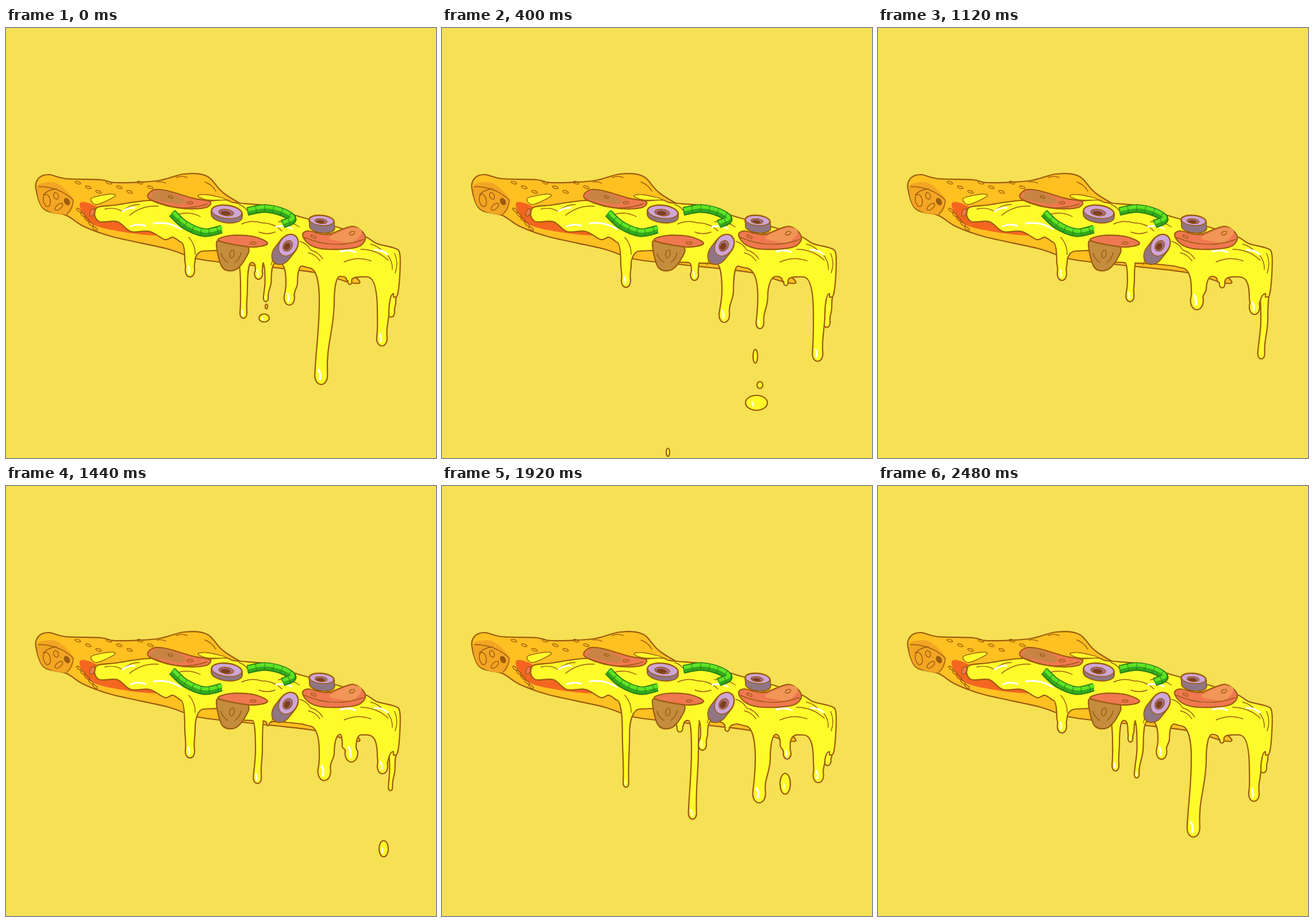
These frames come from a looping animation (748x748 px, 2560 ms). An HTML page with a canvas:

```html
<!DOCTYPE html>
<html lang="en">
<head>
<meta charset="utf-8">
<title>Melting slice</title>
<style>
html, body { margin: 0; width: 100%; height: 100%; overflow: hidden; background: #f6e053; }
canvas { display: block; }
</style>
</head>
<body>
<canvas id="stage" width="748" height="748"></canvas>
<script>
const ctx = document.getElementById('stage').getContext('2d');
const STEP = 80, STEPS = 32, GRAVITY = 14, THIN = 1.4, BOLD = 2.2;
const INK = '#9b5b0d', CHEESE = '#fffb2b', CRUST = '#ffc021', CRUST_DARK = '#f3a523', SAUCE = '#f4661f';
const RED = '#ef7851', TAN = '#c98445', PEACH = '#f19656', LILAC = '#cda5d8';

// Adds a smooth curve through flat x,y points to a path.
function spline(path, pts, closed, join) {
  const n = pts.length / 2;
  const at = i => {
    const j = closed ? (i + n) % n : Math.max(0, Math.min(n - 1, i));
    return [pts[2 * j], pts[2 * j + 1]];
  };
  path[join ? 'lineTo' : 'moveTo'](pts[0], pts[1]);
  for (let i = 0; i < (closed ? n : n - 1); i++) {
    const [a, b, c, d] = [at(i - 1), at(i), at(i + 1), at(i + 2)];
    path.bezierCurveTo(b[0] + (c[0] - a[0]) / 6, b[1] + (c[1] - a[1]) / 6,
      c[0] - (d[0] - b[0]) / 6, c[1] - (d[1] - b[1]) / 6, c[0], c[1]);
  }
  if (closed) path.closePath();
}

function paint(path, fill, width = BOLD, ink = INK) {
  if (fill) { ctx.fillStyle = fill; ctx.fill(path); }
  if (width) { ctx.lineWidth = width; ctx.strokeStyle = ink; ctx.stroke(path); }
}

function curve(pts, closed) {
  const p = new Path2D();
  spline(p, pts, closed);
  return p;
}

function blob(pts, fill, width) {
  const p = curve(pts, true);
  paint(p, fill, width);
  return p;
}

function oval(x, y, rx, ry, turn = 0, fill = null, width = THIN) {
  const p = new Path2D();
  p.ellipse(x, y, rx, ry, turn, 0, Math.PI * 2);
  paint(p, fill, width);
}

// Short strokes, each given by its two ends and bent upwards a little.
function strokes(ends, width = THIN, ink = INK) {
  const p = new Path2D();
  for (let i = 0; i < ends.length; i += 4) {
    const [x0, y0, x1, y1] = ends.slice(i, i + 4);
    p.moveTo(x0, y0);
    p.quadraticCurveTo((x0 + x1) / 2 + (y1 - y0) / 5, (y0 + y1) / 2 - (x1 - x0) / 5, x1, y1);
  }
  paint(p, null, width, ink);
}

// Height of the cheese rim at x, and any other value along flat pairs.
function along(pairs, t) {
  let i = 0;
  while (i < pairs.length - 4 && pairs[i + 2] <= t) i += 2;
  const [a, va, b, vb] = pairs.slice(i, i + 4);
  const u = Math.min(1, (t - a) / (b - a));
  return { value: va + (vb - va) * u, slope: (vb - va) / (b - a) };
}
const RIM = [303,372, 344,388, 403,407, 477,410, 515,414, 581,432, 628,433, 674,462];
const rim = x => along(RIM, x).value;

// A strand: centre, half width, bulb radius, drift per length, root ends, then step,tip pairs.
function makeDrip(x, w, r, lean, left, right, keys) {
  return { x, w, r, lean, left, right, keys: keys.concat(STEPS, keys[1]) };
}
const edge = makeDrip(672, 6, 6, -.045, 660, 682, [0,503, 9,535, 17,600, 18,530, 20,492, 27,482]);
const back = makeDrip(320, 9, 8, 0, 303, 344, [0,433, 5,451, 9,438, 14,439, 24,524, 25,440, 27,416]);
const front = [
  makeDrip(656, 10, 9, -.02, 628, 674, [0,553, 9,601, 10,560, 12,497, 21,502]),
  makeDrip(597, 12, 11, .08, 581, 618, [0,446, 14,452, 23,515, 24,475, 27,452]),
  makeDrip(558, 13, 11, -.05, 526, 581, [0,620, 3,640, 5,523, 9,473, 14,490, 21,529, 27,573]),
  makeDrip(497, 10, 9, -.06, 477, 515, [0,482, 7,524, 9,459, 13,413, 22,413]),
  makeDrip(456, 6, 7, -.06, 447, 468, [0,476, 3,410, 17,410, 27,481, 31,508]),
  makeDrip(440, 6, 7, -.025, 429, 448, [0,437, 5,439, 14,476, 25,590, 26,550, 29,462]),
  makeDrip(414, 6, 6, -.01, 403, 427, [0,505, 1,515, 2,450, 4,408, 22,408, 27,458])
];

// Falling pieces: step of release, x, y, half width, half height.
const drops = [
  [-.5, 449, 501, 9, 7], [-.5, 453, 481, 2, 4], [1, 393, 514, 3, 7],
  [4, 547, 638, 19, 13], [4, 553, 607, 5, 6], [4, 545, 557, 4, 12],
  [8, 490, 514, 12, 11], [8, 492, 471, 4, 11], [18, 657, 631, 8, 14], [24, 597, 518, 9, 18],
  [25, 320, 499, 10, 27], [25, 315, 459, 4, 7], [26, 433, 583, 14, 11], [26, 438, 534, 4, 4]
];

// The bulb is thin while a strand snaps back.
function tipAt({ keys, x, r, lean, left, right }, k) {
  const { value: y, slope } = along(keys, k);
  const base = (rim(left) + rim(right)) / 2, len = y - base;
  return { y, base, len, x: x + lean * len, r: Math.min(slope < -6 ? r * .6 : r, len / 4) };
}

// Runs the rim from the right root, round the tip, to the left root.
function hang(path, drip, k) {
  const { left, right, x } = drip, ly = rim(left), ry = rim(right);
  const { y, base, len, x: tx, r } = tipAt(drip, k);
  path.lineTo(right, ry);
  if (len < 4) { path.lineTo(left, ly); return; }
  const flare = Math.min(50, len * .45), w = Math.min(drip.w, r * 1.3);
  const mid = base + flare, neck = y - r * 1.7, span = neck - mid, dip = neck + r * 2.27;
  const side = (s, root) => [x + s * w + (root - x - s * w) * .35, x + s * w, tx + s * r * .75, tx + s * r];
  const [r0, r1, r2, r3] = side(1, right), [l0, l1, l2, l3] = side(-1, left);
  path.bezierCurveTo(r0, ry, r1, ry + flare * .4, r1, mid);
  path.bezierCurveTo(r1, mid + span * .4, r2, mid + span * .6, r3, neck);
  path.bezierCurveTo(tx + r * 1.15, dip, tx - r * 1.15, dip, l3, neck);
  path.bezierCurveTo(l2, mid + span * .6, l1, mid + span * .4, l1, mid);
  path.bezierCurveTo(l1, ly + flare * .4, l0, ly, left, ly);
}

function gloss(drip, k) {
  const { x, y, r, len } = tipAt(drip, k);
  if (len > 24) strokes([x - r * .4, y - r * 2.3, x - r * .2, y - r * .8], r * .35, '#fff');
}

function drawCrust() {
  blob([52,279, 57,261, 75,255, 103,262, 165,264, 190,269, 262,266, 310,254, 350,258, 381,289,
    450,330, 560,400, 613,438, 600,443, 535,425, 420,412, 335,402, 280,384, 185,363, 135,345,
    105,326, 66,315], CRUST);
  blob([54,282, 62,270, 90,271, 117,299, 106,324, 66,314], CRUST_DARK, 0);
  strokes([56,276, 117,299, 117,299, 106,324]);
  blob([128,307, 148,306, 205,338, 268,360, 205,355, 148,340], SAUCE, 0);
  oval(150, 321, 4, 7, .4, RED);
  for (let i = 0; i < 8; i++) oval(125 + i * 18, 269 + i % 3 * 8, 5, 2, .3);
  for (let i = 0; i < 5; i++) oval(127 + i * 7, 317 + i * 8, 5, 2, .7);
  oval(71, 300, 6, 11, -.2);
  oval(92, 311, 8, 4, -.7);
  oval(87, 292, 4, 6, -.4);
  oval(106, 302, 4, 6, -.5, INK);
  strokes([65,290, 88,280, 263,268, 278,270, 296,260, 315,260, 346,268, 365,284]);
}

function cheesePath(k) {
  const p = curve([154,326, 159,312, 190,308, 250,300, 320,303, 380,299, 398,304, 460,310, 500,325,
    575,346, 625,363, 645,375, 676,383, 685,393, 685,430, 681,464, 674,468]);
  front.forEach(drip => hang(p, drip, k));
  p.lineTo(366, 387);
  hang(p, back, k);
  spline(p, [303,372, 290,364, 276,368, 250,354, 217,354, 194,337, 163,337, 154,326], false, true);
  p.closePath();
  return p;
}

function drawCheeseMarks() {
  blob([149,296, 181,289, 189,293, 158,307], CHEESE, THIN);
  blob([334,292, 350,290, 383,298, 350,299], CHEESE, THIN);
  strokes([172,315, 202,319, 202,319, 232,307, 215,326, 265,310, 318,364, 329,394, 300,324, 338,328,
    405,307, 422,321, 410,341, 445,339, 445,339, 480,353, 474,337, 510,346, 468,355, 440,355,
    511,371, 530,386, 530,386, 551,402, 526,391, 546,405, 588,407, 635,405, 617,385, 665,404,
    634,376, 656,390, 663,394, 672,420, 676,392, 677,426, 463,398, 461,412]);
  strokes([217,345, 242,344, 257,340, 304,350, 203,319, 224,313, 470,346, 497,349, 582,389, 608,390,
    641,386, 664,394], 3, '#fff');
}

function drawPepperoni() {
  blob([249,297, 256,282, 280,283, 325,296, 355,302, 345,313, 300,313], RED);
  blob([252,296, 260,284, 280,284, 312,299, 302,307, 270,301], TAN, 0);
  strokes([350,306, 253,300]);
  oval(286, 294, 4, 2, .3);
  oval(320, 304, 5, 2);

  blob([366,376, 376,371, 420,380, 416,402, 398,421, 376,416], '#c48c3d');
  blob([370,370, 390,361, 432,363, 455,375, 425,381], RED);
  oval(430, 374, 5, 2);
  oval(393, 393, 4, 7, .2);
  strokes([386,408, 374,392, 409,391, 398,408]);

  blob([516,361, 526,353, 560,359, 603,345, 625,363, 611,381, 560,385, 530,378], RED);
  blob([563,364, 602,347, 619,354, 604,372, 580,371], PEACH, 0);
  strokes([622,368, 519,364, 540,357, 566,360]);
  oval(535, 363, 5, 2, .5);
  oval(602, 357, 5, 3, -.4);
}

function pepper(pts) {
  const p = curve(pts);
  ctx.save();
  ctx.lineCap = 'butt';
  paint(p, null, 15, '#277c14');
  paint(p, null, 11, '#33a91c');
  ctx.translate(1, -3);
  paint(p, null, 6, '#5fe424');
  ctx.translate(-1, 3);
  ctx.setLineDash([1, 14]);
  paint(p, null, 12, '#277c14');
  ctx.restore();
}

// A ring pushed out along dx,dy to give it a side.
function olive(x, y, rx, ry, turn, dx, dy) {
  const sweep = (fill, width) => {
    for (let s = 0; s <= 1; s += .1) oval(x + dx * s, y + dy * s, rx, ry, turn, fill, width);
  };
  sweep(INK, BOLD * 1.6);
  sweep('#907583', 0);
  oval(x, y, rx, ry, turn, LILAC);
  oval(x - 1, y + 1, rx / 2, ry / 2, turn, '#a66c8c');
  oval(x - 2, y + 2, rx / 3, ry / 3, turn, '#7c411b', 0);
}

function drawDrops(k) {
  for (const [start, x, y0, rx, ry] of drops) {
    const n = k - start;
    if (n < 0 || n > 6) continue;
    const y = y0 + GRAVITY * n * n;
    oval(x, y, rx, ry, 0, CHEESE, BOLD);
    if (rx > 6) strokes([x - rx * .4, y - ry * .1, x - rx * .3, y + ry * .5], BOLD, '#fff');
  }
}

function render(now) {
  const k = Math.floor(now / STEP) % STEPS;
  ctx.fillStyle = '#f6e053';
  ctx.fillRect(0, 0, 748, 748);
  drawCrust();
  const strand = new Path2D();
  strand.moveTo(edge.right, rim(edge.right));
  hang(strand, edge, k);
  paint(strand, CHEESE);
  paint(cheesePath(k), CHEESE);
  drawCheeseMarks();
  [back, ...front].forEach(drip => gloss(drip, k));
  drawPepperoni();
  pepper([289,322, 312,343, 345,356, 375,350]);
  pepper([420,319, 450,314, 482,321, 498,333, 481,341]);
  olive(384, 320, 26, 11, .12, 0, 7);
  olive(549, 335, 21, 8.5, .1, 1, 12);
  olive(491, 378, 15, 20, .6, -11, 14);
  drawDrops(k);
}

ctx.lineCap = ctx.lineJoin = 'round';
const began = performance.now();
function tick() {
  render(performance.now() - began);
  requestAnimationFrame(tick);
}
tick();
</script>
</body>
</html>
```
